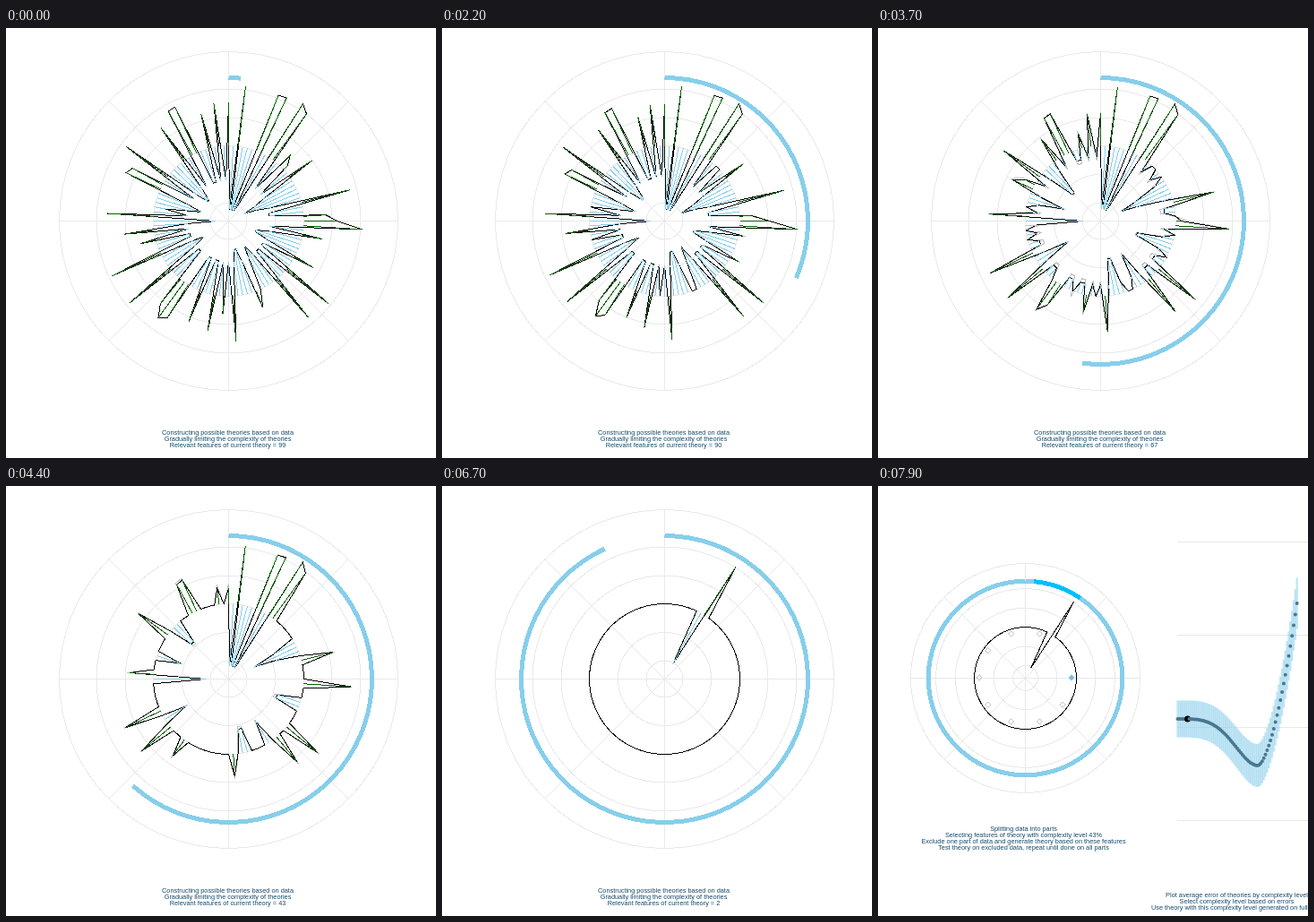
Write an HTML page that moves like this. It is 480 px wide and 480 px high and loops after 8 s.

```html
<!DOCTYPE html>
<html lang="en">
<head>
<meta charset="utf-8">
<title>Theory selection</title>
<style>
  html, body { margin: 0; width: 100%; height: 100%; overflow: hidden; background: #fff; }
  svg { display: block; width: 480px; height: 480px; }
  svg * { fill: none; shape-rendering: crispEdges; }
  .grid { stroke: #e9e9e9; }
  .past { stroke: #bebebe; }
  .shape { stroke: #000; }
  .plus { stroke: #006400; }
  .minus { stroke: #87ceeb; }
  .ring { stroke: #87ceeb; stroke-width: 5; }
  .turn { stroke: #00bfff; stroke-width: 5; }
  .part { stroke: #bebebe; shape-rendering: auto; }
  .out { fill: #6fbfe0; stroke: #87ceeb; shape-rendering: auto; }
  .band { stroke: #87ceeb; stroke-opacity: .5; stroke-width: 2.4; shape-rendering: auto; }
  .dot { fill: #48788f; shape-rendering: auto; }
  .now { fill: #000; shape-rendering: auto; }
  svg text { font: 7.35px "Liberation Sans", Arial, sans-serif; text-anchor: middle; fill: #124a6b; }
</style>
</head>
<body>
<svg id="stage" viewBox="0 0 480 480"></svg>
<script>
const STEP = 100, LOOP = 8000, LEVELS = 73, N = 100, BASE = 84, STRONG = 10;
const DECAY = Math.pow(1e-4, 1 / 99);
const stage = document.getElementById('stage');

// Key features [index, radius], clockwise from the top
const keys = new Map([
  [0, 133], [2, 152], [6, 151], [7, 152], [9, 155], [10, 148], [12, 103], [13, 97],
  [15, 116], [21, 140], [24, 110], [25, 122], [26, 150], [28, 108], [33, 109], [36, 145],
  [39, 140], [43, 95], [44, 106], [49, 135], [51, 106], [53, 125], [56, 121], [59, 128],
  [60, 134], [61, 120], [64, 143], [68, 144], [71, 104], [73, 118], [75, 14], [76, 136],
  [78, 68], [82, 127], [83, 123], [85, 142], [90, 129], [92, 140], [93, 141], [96, 124],
  [98, 133]
]);

// Between the keys the outline dips, deeper the farther a key is
function fullRadius(i) {
  if (keys.has(i)) return keys.get(i);
  if (i <= STRONG) return 13;
  let gap = 1;
  while (!keys.has(i - gap) && !keys.has((i + gap) % N)) gap++;
  return 58 - 13 * gap;
}

const features = Array.from({ length: N }, (_, i) => {
  const size = fullRadius(i) - BASE;
  if (i === 8 || i === 9) return { size, zero: 1, power: .1 };
  if (i > 0 && i <= STRONG) return { size, zero: .5, power: .2 };
  return { size, zero: .09 * Math.abs(size / 50) ** 3, power: .5 };
});

const penalty = level => Math.pow(DECAY, LEVELS - 1 - level);

function radius({ size, zero, power }, level) {
  return BASE + size * Math.pow(Math.max(0, 1 - penalty(level) / zero), power);
}

const counts = [[0, 99], [15, 96], [29, 84], [37, 67], [52, 15], [67, 2], [72, 0]];

function countAt(level) {
  const k = Math.max(1, counts.findIndex(([x]) => x >= level));
  const [x0, y0] = counts[k - 1], [x1, y1] = counts[k];
  return Math.ceil(y0 + (y1 - y0) * (level - x0) / (x1 - x0));
}

function path(cls, d) {
  return `<path class="${cls}" d="${d}"/>`;
}

function circle(cls, x, y, r) {
  return `<circle class="${cls}" cx="${x}" cy="${y}" r="${r}"/>`;
}

function lines(x, y, rows) {
  return rows.map((row, k) => `<text x="${x}" y="${y + 7 * k}">${row}</text>`).join('');
}

function wheel(cx, cy, scale) {
  const at = (deg, r) => {
    const a = deg * Math.PI / 180;
    return (cx + r * scale * Math.sin(a)).toFixed(2) + ' ' + (cy - r * scale * Math.cos(a)).toFixed(2);
  };
  const angle = i => i * 360 / N;
  return {
    grid() {
      const circles = [20.5, 52, BASE, 115.5, 147.5, 189].map(r => circle('grid', cx, cy, r * scale));
      const spokes = [0, 45, 90, 135].map(d => `M${at(d, 189)}L${at(d + 180, 189)}`);
      return circles.join('') + path('grid', spokes.join(''));
    },
    outline(cls, level) {
      return path(cls, 'M' + features.map((f, i) => at(angle(i), radius(f, level))).join('L') + 'Z');
    },
    bars(level) {
      let plus = '', minus = '';
      features.forEach((f, i) => {
        const r = radius(f, level), line = `M${at(angle(i), BASE)}L${at(angle(i), r)}`;
        if (r > BASE) plus += line;
        else if (r < BASE) minus += line;
      });
      return path('plus', plus) + path('minus', minus);
    },
    arc(cls, from, to) {
      const points = [];
      for (let k = from; k <= to; k++) points.push(at(k * 360 / LEVELS, 160));
      return points.length > 1 ? path(cls, 'M' + points.join('L')) : '';
    }
  };
}

function parts(cx, cy) {
  let out = '';
  for (let k = 0; k < 9; k++) {
    const a = k * Math.PI / 5;
    const x = cx + 51.5 * Math.cos(a), y = cy + 51.5 * Math.sin(a);
    out += path(k ? 'part' : 'out', `M${x - 3} ${y}l3 -3.2l3 3.2l-3 3.2Z`);
  }
  return out;
}

// Falls gently to the best level, then climbs steeply
function errorAt(u) {
  const best = .672;
  return u < best
    ? 286 - 26 * Math.cos(Math.PI * (u / best) ** 1.8)
    : 312 - 181 * ((u - best) / (1 - best)) ** 1.65;
}

function errorPlot(current) {
  const grid = [62.5, 166.5, 269.5, 373.5].map(y => `M334 ${y}H480`).join('');
  let band = '', dots = '';
  for (let k = 0; k < LEVELS; k++) {
    const u = k / (LEVELS - 1), x = 334.5 + 133.2 * u, y = errorAt(u), h = 20.5 + 8 * u * u;
    band += path('band', `M${x} ${y - h}V${y + h}`);
    dots += k === current ? circle('now', x, y, 3.5) : circle('dot', x, y, 2);
  }
  return path('grid', grid) + band + dots;
}

const big = wheel(248.5, 215.5, 1), small = wheel(164.5, 214.5, .677);

function limiting(level) {
  return big.grid() + big.arc('ring', 0, level + 1) +
    (level ? big.outline('past', level - 1) : '') +
    big.outline('shape', level) + big.bars(level) +
    lines(247.5, 454, [
      'Constructing possible theories based on data',
      'Gradually limiting the complexity of theories',
      'Relevant features of current theory = ' + countAt(level)
    ]);
}

function selecting(k) {
  const level = LEVELS - 1 - k;
  const percent = Math.round(100 * (1 - penalty(level)));
  return small.grid() + small.arc('ring', 0, LEVELS) + small.arc('turn', 1, k + 1) +
    small.outline('shape', level) + parts(164.5, 214) + errorPlot(k) +
    lines(162.5, 385, [
      'Splitting data into parts',
      `Selecting features of theory with complexity level ${percent}%`,
      'Exclude one part of data and generate theory based on these features',
      'Test theory on excluded data, repeat until done on all parts'
    ]) +
    lines(400.5, 459, [
      'Plot average error of theories by complexity level',
      'Select complexity level based on errors',
      'Use theory with this complexity level generated on full data'
    ]);
}

let shown = -1;
function draw() {
  const step = Math.floor(performance.now() % LOOP / STEP);
  if (step !== shown) {
    shown = step;
    stage.innerHTML = step < LEVELS ? limiting(step) : selecting(step - LEVELS);
  }
  requestAnimationFrame(draw);
}
draw();
</script>
</body>
</html>
```
